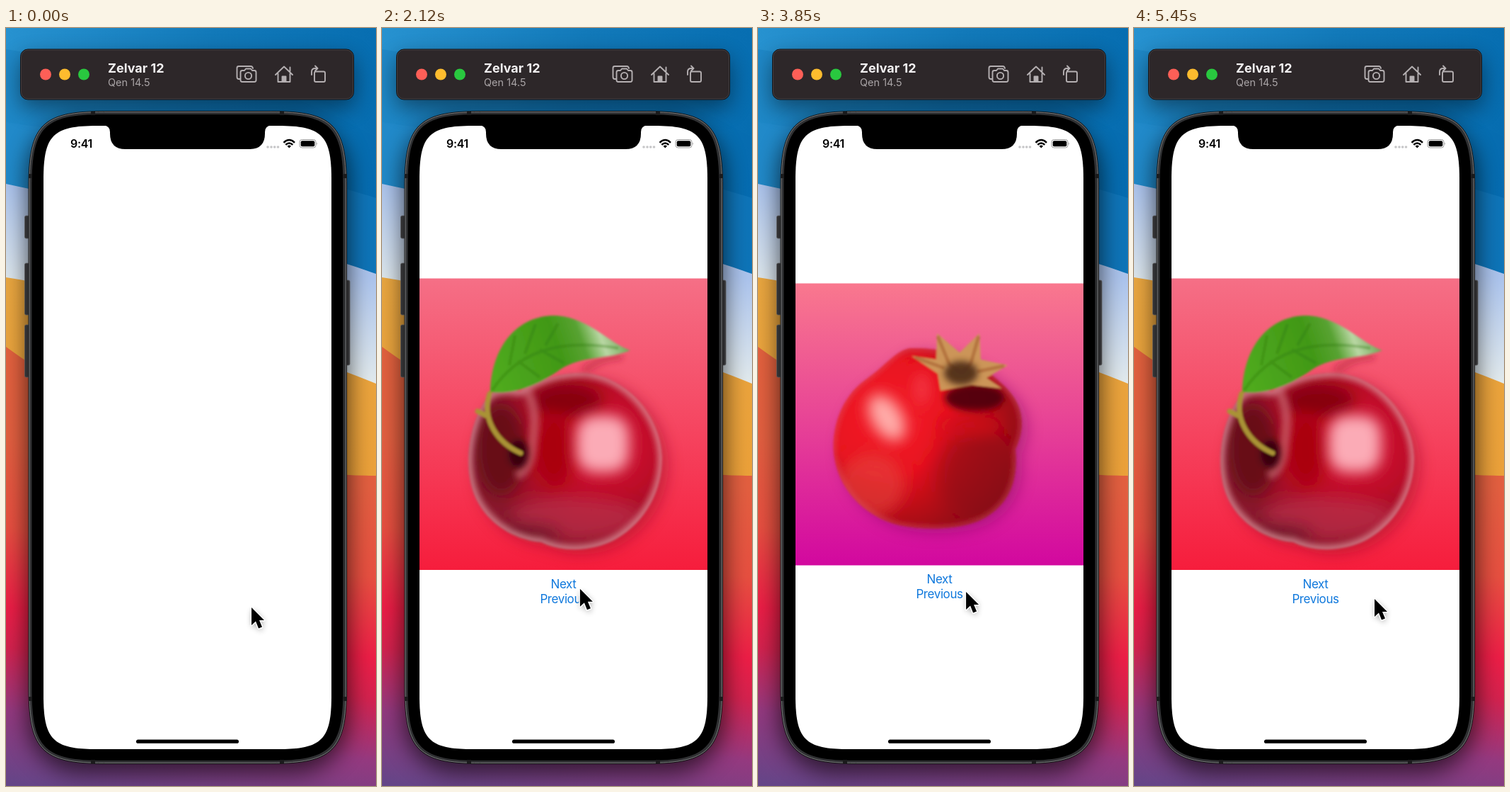
Animation, 523 px wide and 1070 px high, one loop 5.59 s. Source, as an HTML page:

```html
<!DOCTYPE html>
<html lang="en">
<head>
<meta charset="utf-8">
<title>Fruit slides</title>
<style>
html, body { margin: 0; width: 100%; height: 100%; overflow: hidden; background: #0b68a8; }
svg { display: block; width: 523px; height: 1070px; }
text { font-family: Inter, "Open Sans", sans-serif; }
.btn { font-size: 17px; letter-spacing: -.4px; fill: #0f78dc; text-anchor: middle; }
.icon { fill: none; stroke: #b5b0b2; stroke-width: 1.9; stroke-linecap: round; stroke-linejoin: round; }
</style>
</head>
<body>
<svg viewBox="0 0 523 1070">
<defs>
  <linearGradient id="sky" x1="0" y1="0" x2="1" y2=".35">
    <stop offset="0" stop-color="#2792d0"/><stop offset=".5" stop-color="#1279b9"/><stop offset="1" stop-color="#046baf"/>
  </linearGradient>
  <linearGradient id="ice" gradientUnits="userSpaceOnUse" x1="0" y1="220" x2="-36" y2="360">
    <stop offset="0" stop-color="#abc3ec"/><stop offset="1" stop-color="#e2eaec"/>
  </linearGradient>
  <linearGradient id="gold" x1="0" y1="0" x2="0" y2="1">
    <stop offset="0" stop-color="#e9a640"/><stop offset="1" stop-color="#eb9f38"/>
  </linearGradient>
  <linearGradient id="warm" gradientUnits="userSpaceOnUse" x1="0" y1="450" x2="-87" y2="1070">
    <stop offset="0" stop-color="#e2613e"/><stop offset=".2" stop-color="#e25f40"/><stop offset=".4" stop-color="#e64f40"/>
    <stop offset=".58" stop-color="#eb1e46"/><stop offset=".67" stop-color="#d4224e"/>
    <stop offset=".81" stop-color="#94397f"/><stop offset="1" stop-color="#5d4789"/>
  </linearGradient>
  <linearGradient id="pink" x1="0" y1="0" x2="0" y2="1">
    <stop offset="0" stop-color="#f56f86"/><stop offset="1" stop-color="#f61d3c"/>
  </linearGradient>
  <linearGradient id="magenta" x1="0" y1="0" x2="0" y2="1">
    <stop offset="0" stop-color="#f9788e"/><stop offset=".5" stop-color="#e74296"/><stop offset="1" stop-color="#d2089f"/>
  </linearGradient>
  <radialGradient id="plumSkin" cx=".68" cy=".4" r=".62">
    <stop offset="0" stop-color="#dc1434"/><stop offset=".5" stop-color="#bc0c28"/><stop offset="1" stop-color="#8a1a2e"/>
  </radialGradient>
  <radialGradient id="pomSkin" cx=".3" cy=".38" r=".76">
    <stop offset="0" stop-color="#f5222c"/><stop offset=".42" stop-color="#e8121f"/>
    <stop offset=".72" stop-color="#b50a17"/><stop offset="1" stop-color="#860814"/>
  </radialGradient>
  <linearGradient id="leafSkin" x1="0" y1=".6" x2="1" y2=".4">
    <stop offset="0" stop-color="#4faa1e"/><stop offset=".5" stop-color="#419816"/><stop offset=".68" stop-color="#58a232"/>
    <stop offset=".82" stop-color="#b9d7a4"/><stop offset="1" stop-color="#6ba04e"/>
  </linearGradient>
  <filter id="b1"><feGaussianBlur stdDeviation="1.5"/></filter>
  <filter id="b4" x="-50%" y="-50%" width="200%" height="200%"><feGaussianBlur stdDeviation="4"/></filter>
  <filter id="b10" x="-60%" y="-60%" width="220%" height="220%"><feGaussianBlur stdDeviation="10"/></filter>
  <filter id="b16" x="-30%" y="-60%" width="160%" height="220%"><feGaussianBlur stdDeviation="16"/></filter>
  <clipPath id="screen"><path data-box="53 138 407 880 49.4"/></clipPath>
  <path id="plumShape" d="M150 520C126 552 118 600 124 635C132 690 180 722 225 726C258 742 300 738 330 722C375 696 397 650 396 605C394 550 350 495 290 487C250 484 215 500 195 513C180 510 160 510 150 520Z"/>
  <clipPath id="plumClip"><use href="#plumShape"/></clipPath>
  <path id="pomShape" d="M215 452C195 455 180 477 150 498C120 520 104 560 107 600C112 650 150 690 200 702C240 710 290 708 320 692C355 672 368 640 364 595C380 560 374 530 348 505C320 480 290 450 215 452Z"/>
  <clipPath id="pomClip"><use href="#pomShape"/></clipPath>
</defs>

<!-- desktop -->
<rect width="523" height="1070" fill="url(#sky)"/>
<path d="M0 30C150 55 330 40 523 155V350H0Z" fill="#0868ab" opacity=".22"/>
<path d="M0 133C120 150 300 170 523 240V350H0Z" fill="#2d92d2" opacity=".22"/>
<path d="M0 220C150 252 370 292 523 347V560H0Z" fill="url(#ice)"/>
<path d="M0 352C110 368 380 443 523 502V700H0Z" fill="url(#gold)"/>
<path d="M0 450C130 545 330 632 523 632V1070H0Z" fill="url(#warm)"/>

<!-- title bar -->
<rect x="20" y="42" width="472" height="71" rx="11" filter="url(#b16)" opacity=".45"/>
<rect x="30" y="130" width="454" height="921" rx="76" filter="url(#b16)" opacity=".64"/>
<rect x="20.500" y="30" width="471" height="71" rx="10.500" fill="#2d2729" stroke="#131112"/>
<rect x="21.500" y="31" width="469" height="69" rx="9.500" fill="none" stroke="#5d585a" stroke-width=".7" opacity=".7"/>
<circle cx="56" cy="65.500" r="8" fill="#fe5f57"/>
<circle cx="83" cy="65.500" r="8" fill="#febc2e"/>
<circle cx="110" cy="65.500" r="8" fill="#29c83f"/>
<text x="144" y="63" font-size="18" font-weight="700" fill="#f4f2f3">Zelvar 12</text>
<text x="144" y="82" font-size="14.5" fill="#aaa5a7">Qen 14.5</text>
<g class="icon">
  <path d="M331 72H329Q326.500 72 326.500 69V56.500Q326.500 54 329 54H346Q348.500 54 349 57"/>
  <path d="M334 60H337L339 57.500H346L348 60H351Q353.500 60 353.500 62.500V73.500Q353.500 76 351 76H334Q331.500 76 331.500 73.500V62.500Q331.500 60 334 60Z"/>
  <circle cx="342.500" cy="67.500" r="4.600"/>
  <path d="M381 66L393 54.500L405 66M401.500 61V55.500M384.500 64.500V76H401.500V64.500"/>
  <path d="M390.500 76V68.500H395.500V76Z" fill="#b5b0b2"/>
  <rect x="436" y="61.500" width="15" height="14.500" rx="2"/>
  <path d="M432 66V62Q432 57 437 57H440M437 53.500L440.500 57L437 60.500"/>
</g>

<!-- phone -->
<g fill="#303032" stroke="#59595b" stroke-width=".8">
  <rect x="26.500" y="265" width="8" height="32" rx="2"/>
  <rect x="26.500" y="332" width="8" height="73" rx="2"/>
  <rect x="26.500" y="419" width="8" height="74" rx="2"/>
  <rect x="478" y="356" width="8" height="120" rx="2"/>
</g>
<path data-box="32 117.5 449.5 921 70" fill="#303133" stroke="#111"/>
<path data-box="33 118.5 447.5 919 69" fill="none" stroke="#77787a"/>
<path data-box="36.5 122 440 912 65.5"/>
<path fill="#1b1b1c" d="M32 206h5v6h-5zM477 206h5v6h-5zM32 944h5v6h-5zM477 944h5v6h-5zM120 118h6v5h-6zM387 118h6v5h-6zM120 1033h6v5h-6zM387 1033h6v5h-6z"/>
<path data-box="53 138 407 880 49.4" fill="#fff"/>

<g clip-path="url(#screen)">
  <g id="content">
    <g id="plum">
      <rect x="53" y="353.500" width="407" height="411.500" fill="url(#pink)"/>
      <use href="#plumShape" transform="translate(9 7)" fill="#a00d28" opacity=".5" filter="url(#b10)"/>
      <g filter="url(#b1)">
        <use href="#plumShape" fill="url(#plumSkin)"/>
        <g clip-path="url(#plumClip)">
          <ellipse cx="168" cy="595" rx="36" ry="66" fill="#600812" opacity=".85" filter="url(#b10)"/>
          <ellipse cx="262" cy="526" rx="50" ry="24" fill="#82060c" opacity=".9" filter="url(#b10)"/>
          <ellipse cx="243" cy="595" rx="30" ry="52" fill="#a80409" opacity=".9" filter="url(#b10)"/>
          <ellipse cx="275" cy="690" rx="90" ry="30" fill="#bd3952" opacity=".55" filter="url(#b10)"/>
          <ellipse cx="205" cy="716" rx="46" ry="14" fill="#681627" opacity=".7" filter="url(#b10)"/>
          <path d="M205 512C222 545 214 570 212 596Q208 625 190 632" fill="none" stroke="#ce717b" stroke-width="13" opacity=".65" filter="url(#b4)"/>
          <ellipse cx="193" cy="601" rx="14" ry="20" fill="#32030a" opacity=".9" filter="url(#b4)"/>
          <rect x="275" y="547" width="74" height="80" rx="26" fill="#fbabb6" filter="url(#b10)"/>
          <use href="#plumShape" fill="none" stroke="#e39ba3" stroke-width="12" opacity=".75" filter="url(#b4)"/>
        </g>
        <path d="M152 516C140 553 164 586 196 600M135 541L149 548" fill="none" stroke="#a99334" stroke-width="7" stroke-linecap="round"/>
        <path d="M285 485Q305 465 340 463" fill="none" stroke="#a91b32" stroke-width="12" opacity=".4" filter="url(#b4)"/>
        <path d="M153 514C155 445 195 405 245 406C292 408 322 446 351 455C320 468 282 462 252 482C215 508 184 517 153 514Z" fill="url(#leafSkin)"/>
        <path d="M156 511C190 460 245 437 334 452M180 476L188 434M202 460L217 418M231 448L249 417M192 470L223 493M223 454L257 473" fill="none" stroke="#2b760c" stroke-width="4" opacity=".35"/>
      </g>
    </g>
    <g id="pom">
      <rect x="53" y="360.500" width="407" height="398" fill="url(#magenta)"/>
      <use href="#pomShape" transform="translate(9 7)" fill="#8b0868" opacity=".5" filter="url(#b10)"/>
      <g filter="url(#b1)">
        <use href="#pomShape" fill="url(#pomSkin)"/>
        <g clip-path="url(#pomClip)">
          <ellipse cx="160" cy="645" rx="48" ry="46" fill="#e4453c" opacity=".6" filter="url(#b10)"/>
          <ellipse cx="308" cy="630" rx="56" ry="66" fill="#870713" opacity=".6" filter="url(#b16)"/>
          <ellipse cx="306" cy="522" rx="42" ry="19" fill="#4c020a" opacity=".9" filter="url(#b4)"/>
          <ellipse cx="300" cy="562" rx="46" ry="14" fill="#cf0c1a" opacity=".7" filter="url(#b10)"/>
          <ellipse cx="232" cy="508" rx="10" ry="24" fill="#fa5360" opacity=".6" filter="url(#b10)"/>
          <ellipse cx="182" cy="550" rx="21" ry="36" transform="rotate(-32 182 550)" fill="#ffb4b0" opacity=".95" filter="url(#b10)"/>
          <use href="#pomShape" fill="none" stroke="#e0586a" stroke-width="6" opacity=".7" filter="url(#b4)"/>
        </g>
        <path d="M217 463L252 468L253 431L285 458L313 431L315 468L353 476L323 494L345 509L302 504L258 512L254 488Z" fill="#cc9558"/>
        <path d="M254 435L270 474L288 488M312 435L301 473L288 488M222 465L263 480M348 477L310 485" fill="none" stroke="#a35c2b" stroke-width="5" opacity=".55"/>
        <ellipse cx="287" cy="487" rx="24" ry="17" fill="#4c2a12" opacity=".9" filter="url(#b4)"/>
      </g>
    </g>
    <g id="buttons">
      <text class="btn" id="next" x="256.500" y="790.500">Next</text>
      <text class="btn" id="prev" x="256.500" y="811.500">Previous</text>
    </g>
  </g>
</g>

<!-- notch and status -->
<path d="M138 137.500Q147 138 147 147V149Q147 171 169 171H344Q366 171 366 149V147Q366 138 375 137.500Z"/>
<text x="91" y="169" font-size="16" font-weight="600" letter-spacing="-.3">9:41</text>
<g fill="#c6c6c8"><circle cx="370" cy="168" r="1.800"/><circle cx="375" cy="168" r="1.800"/><circle cx="379.700" cy="168" r="1.800"/><circle cx="384.500" cy="168" r="1.800"/></g>
<g fill="none" stroke="#000" stroke-width="2.500">
  <path d="M392.500 161.800Q400.300 154.300 408 161.800M395.300 164.900Q400.300 160 405.300 164.900"/>
  <path d="M397.600 166.700Q400.300 164.500 403 166.700L400.300 169.500Z" fill="#000" stroke="none"/>
</g>
<rect x="415" y="157.500" width="23" height="11.500" rx="3.500" fill="none" stroke="#999"/>
<rect x="416.700" y="159.200" width="19.600" height="8.100" rx="2"/>
<path d="M439.200 161.500Q441 163.200 439.200 165Z" fill="#999"/>
<rect x="184" y="1004.500" width="145" height="5.300" rx="2.650"/>

<g id="cursor">
  <path d="M0 1V26L6 20.500L10 30.500L15 28.500L11 19H18Z" transform="translate(1 3)" opacity=".4" filter="url(#b4)"/>
  <path d="M0 1V26L6 20.500L10 30.500L15 28.500L11 19H18Z" stroke="#fff" stroke-width="3" paint-order="stroke" stroke-linejoin="round"/>
</g>
</svg>
<script>
const LOOP = 5590, WIDTH = 407, SLIDE = 350;
const $ = id => document.getElementById(id);
const [content, plum, pom, buttons, next, prev, cursor] =
  ["content", "plum", "pom", "buttons", "next", "prev", "cursor"].map($);

// Rounded box whose corners ease into the straight sides.
function roundBox(x, y, w, h, r) {
  const l = 1.53 * r, c = .272 * r, e = l - c;
  return `M${x} ${y + l}c0 ${-e} ${c} ${-l} ${l} ${-l}h${w - 2 * l}c${e} 0 ${l} ${c} ${l} ${l}` +
    `v${h - 2 * l}c0 ${e} ${-c} ${l} ${-l} ${l}h${2 * l - w}c${-e} 0 ${-l} ${-c} ${-l} ${-l}z`;
}
// The corner's control points sit at distance c from the box corner.
function cornerPath(x, y, w, h, r) {
  const l = 1.53 * r, c = .272 * r, X = x + w, Y = y + h;
  return `M${x} ${y + l}C${x} ${y + c} ${x + c} ${y} ${x + l} ${y}` +
    `H${X - l}C${X - c} ${y} ${X} ${y + c} ${X} ${y + l}` +
    `V${Y - l}C${X} ${Y - c} ${X - c} ${Y} ${X - l} ${Y}` +
    `H${x + l}C${x + c} ${Y} ${x} ${Y - c} ${x} ${Y - l}Z`;
}
for (const el of document.querySelectorAll("[data-box]"))
  el.setAttribute("d", cornerPath(...el.dataset.box.split(" ").map(Number)));

// Bursts of movement: first step, last step, number of steps.
const bursts = [[50, 520, 8], [1720, 2250, 9], [2320, 2450, 3], [2590, 3140, 9],
  [3450, 3920, 8], [4050, 4590, 9], [4650, 5050, 6], [5190, 5450, 5]];

// Pointer tip: time, x, y.
const track = [[0, 347, 817], [1660, 347, 817], [2250, 270, 787], [2650, 270, 787],
  [3000, 361, 817], [3390, 361, 817], [3920, 291, 794], [4590, 291, 794],
  [5050, 348, 809], [5150, 348, 809], [5450, 340, 805]];

const clamp = v => Math.min(1, Math.max(0, v));
const smooth = v => v * v * (3 - 2 * v);

function snap(t) {
  let held = 0;
  for (const [a, b, n] of bursts) {
    if (t < a) break;
    const step = (b - a) / (n - 1);
    held = Math.min(b, a + Math.floor((t - a + 6) / step) * step);
  }
  return held;
}

// cubic-bezier(.42, 0, .58, 1)
function easeInOut(x) {
  x = clamp(x);
  let lo = 0, hi = 1;
  for (let i = 0; i < 18; i++) {
    const s = (lo + hi) / 2, r = 1 - s;
    if (1.26 * r * r * s + 1.74 * r * s * s + s * s * s < x) lo = s; else hi = s;
  }
  return smooth((lo + hi) / 2);
}

function place(el, x) {
  el.setAttribute("display", Math.abs(x) < WIDTH ? "inline" : "none");
  el.setAttribute("transform", `translate(${x.toFixed(2)} 0)`);
}

function pointer(t) {
  const i = track.findIndex(k => k[0] > t);
  if (i < 0) return track[track.length - 1].slice(1);
  const [a, x, y] = track[i - 1], [b, u, v] = track[i];
  const p = smooth((t - a) / (b - a));
  return [x + (u - x) * p, y + (v - y) * p];
}

const press = (t, down, up) =>
  t < down || t > up + 140 ? 1 : .55 + .45 * clamp((t - up) / 140);

function draw(time) {
  const t = snap(time), slide = start => WIDTH * easeInOut((t - start) / SLIDE);
  content.setAttribute("opacity", t < 50 ? 0 : clamp(t / 265));
  if (t < 2590) {
    place(plum, slide(-12) - WIDTH);
    place(pom, -WIDTH);
  } else if (t < 4050) {
    place(plum, slide(2455));
    place(pom, slide(2455) - WIDTH);
  } else {
    place(pom, slide(3966));
    place(plum, slide(3966) - WIDTH);
  }
  const raised = t >= 2590 && t < 4050;
  buttons.setAttribute("transform", `translate(0 ${raised ? -6.8 : 0})`);
  next.setAttribute("opacity", press(t, 2440, 2590));
  prev.setAttribute("opacity", press(t, 3915, 4100));
  cursor.setAttribute("transform", `translate(${pointer(t).map(v => v.toFixed(2)).join(" ")})`);
}

const begin = performance.now();
function tick() {
  draw((performance.now() - begin) % LOOP);
  requestAnimationFrame(tick);
}
tick();
</script>
</body>
</html>
```
